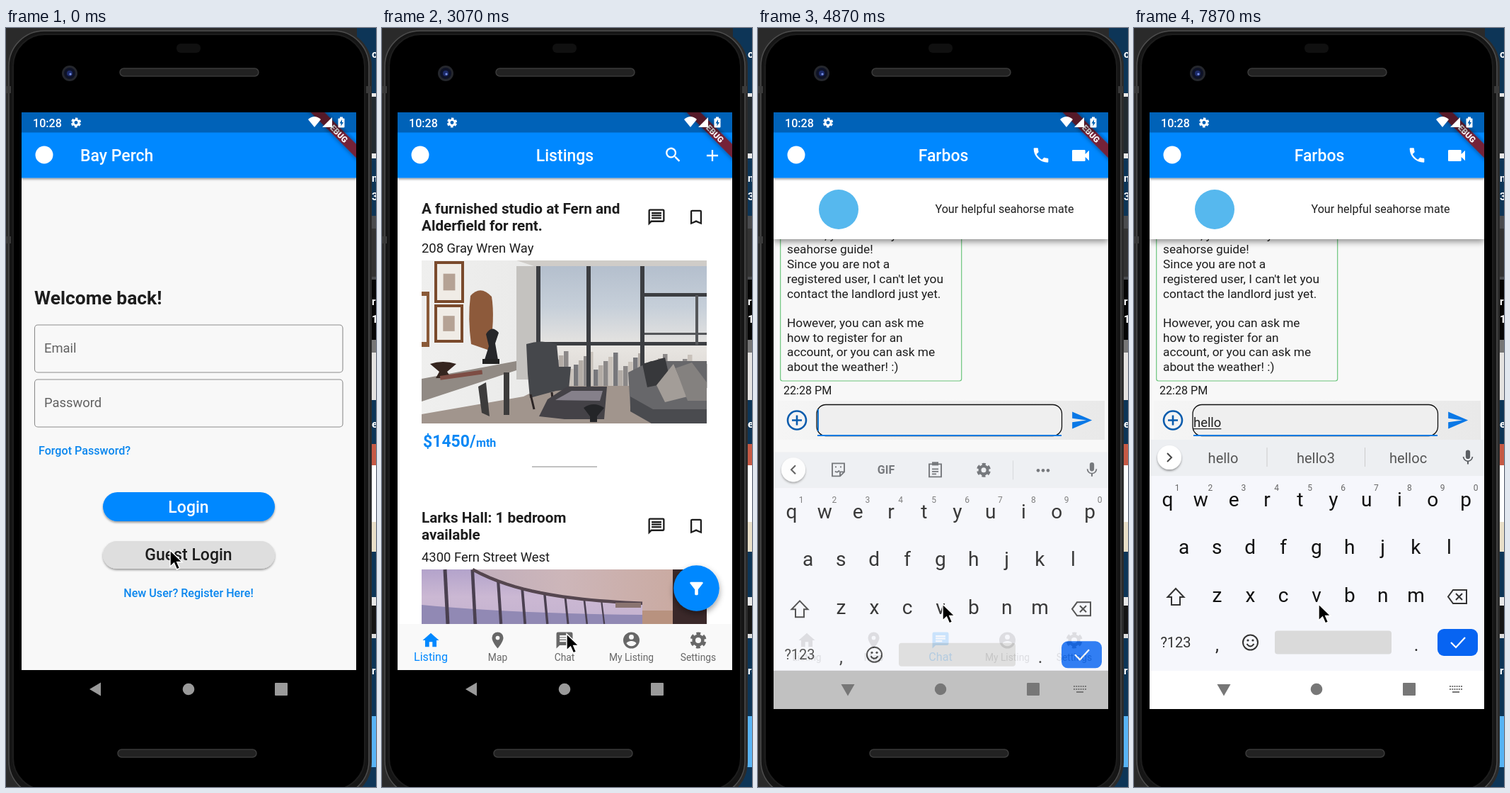
Write an HTML page that moves like this. It is 523x1071 px and loops after 8000 ms.

```html
<!DOCTYPE html>
<html lang="en">
<head>
<meta charset="utf-8">
<title>Chat walkthrough</title>
<style>
html, body { margin: 0; width: 100%; height: 100%; overflow: hidden; background: #1b1b1b; }
svg { display: block; width: 523px; height: 1071px; font-family: Roboto, "Open Sans", sans-serif; }
text { white-space: pre; }
</style>
</head>
<body>
<svg id="stage" viewBox="0 0 523 1071"></svg>
<script>
const BLUE = '#0088ff', INK = '#1d1d1d', GREY = '#686868';

// ---- drawing helpers -------------------------------------------------
const text = (x, y, size, str, fill = INK, weight = 400, anchor = 'start') =>
  `<text x="${x}" y="${y}" font-size="${size}" fill="${fill}" font-weight="${weight}" text-anchor="${anchor}">${str}</text>`;
const mid = (x, y, size, str, fill, weight) => text(x, y, size, str, fill, weight, 'middle');
const rect = (x, y, w, h, fill, r = 0, extra = '') =>
  `<rect x="${x}" y="${y}" width="${w}" height="${h}" rx="${r}" fill="${fill}" ${extra}/>`;
const circle = (x, y, r, fill, extra = '') => `<circle cx="${x}" cy="${y}" r="${r}" fill="${fill}" ${extra}/>`;
const path = (d, fill, extra = '') => `<path d="${d}" fill="${fill}" ${extra}/>`;
const line = (d, color, w = 2, extra = '') => path(d, 'none', `stroke="${color}" stroke-width="${w}" ${extra}`);
const group = (id, inner, extra = '') => `<g id="${id}" ${extra}>${inner}</g>`;

const ICONS = {
  search: 'M15.5 14h-.8l-.3-.3A6.5 6.5 0 1 0 13.7 14.4l.3.3v.8l5 5 1.5-1.5zm-6 0a4.5 4.5 0 1 1 0-9 4.5 4.5 0 0 1 0 9z',
  add: 'M19 13h-6v6h-2v-6H5v-2h6V5h2v6h6z',
  home: 'M10 20v-6h4v6h5v-8h3L12 3 2 12h3v8z',
  place: 'M12 2a7 7 0 0 0-7 7c0 5.2 7 13 7 13s7-7.8 7-13a7 7 0 0 0-7-7zm0 9.5a2.5 2.5 0 0 1 0-5 2.5 2.5 0 0 1 0 5z',
  chat: 'M20 2H4a2 2 0 0 0-2 2v18l4-4h14a2 2 0 0 0 2-2V4a2 2 0 0 0-2-2zM6 9h12v2H6zm8 5H6v-2h8zm4-6H6V6h12z',
  message: 'M20 2H4a2 2 0 0 0-2 2v18l4-4h14a2 2 0 0 0 2-2V4a2 2 0 0 0-2-2zm0 14H5.2L4 17.2V4h16zM6 12h12v2H6zm0-3h12v2H6zm0-3h12v2H6z',
  mark: 'M17 3H7a2 2 0 0 0-2 2v16l7-3 7 3V5a2 2 0 0 0-2-2zm0 15l-5-2.2L7 18V5h10z',
  user: 'M12 2a10 10 0 1 0 0 20 10 10 0 0 0 0-20zm0 3a3 3 0 1 1 0 6 3 3 0 0 1 0-6zm0 14.2A7.2 7.2 0 0 1 6 16c0-2 4-3.1 6-3.1s6 1.1 6 3.1a7.2 7.2 0 0 1-6 3.2z',
  phone: 'M6.6 10.8c1.4 2.8 3.8 5.1 6.6 6.6l2.2-2.2c.3-.3.7-.4 1-.2 1.1.4 2.3.6 3.6.6a1 1 0 0 1 1 1V20a1 1 0 0 1-1 1A17 17 0 0 1 3 4a1 1 0 0 1 1-1h3.5a1 1 0 0 1 1 1c0 1.3.2 2.5.6 3.6.1.3 0 .7-.3 1z',
  video: 'M17 10.5V7a1 1 0 0 0-1-1H4a1 1 0 0 0-1 1v10a1 1 0 0 0 1 1h12a1 1 0 0 0 1-1v-3.5l4 4v-11z',
  send: 'M2 21l21-9L2 3v7l15 2-15 2z',
  funnel: 'M4.2 5.6L10 13v6a1 1 0 0 0 1 1h2a1 1 0 0 0 1-1v-6l5.8-7.4A1 1 0 0 0 19 4H5a1 1 0 0 0-.8 1.6z',
  mic: 'M12 14a3 3 0 0 0 3-3V5a3 3 0 0 0-6 0v6a3 3 0 0 0 3 3zm5.3-3a5.3 5.3 0 0 1-10.6 0H5a7 7 0 0 0 6 6.7V21h2v-3.3a7 7 0 0 0 6-6.7z'
};
const place = (x, y, size, inner) =>
  `<g transform="translate(${x - size / 2} ${y - size / 2}) scale(${size / 24})">${inner}</g>`;
const icon = (name, x, y, fill, size = 27.6) => place(x, y, size, path(ICONS[name], fill, 'fill-rule="evenodd"'));
// Six teeth, the first one centred at 30 degrees.
const gear = (x, y, fill, size = 27.6) => {
  const step = 2 * Math.PI * 8.2 / 6, tooth = step * .57;
  return place(x, y, size,
    circle(12, 12, 5.5, 'none', `stroke="${fill}" stroke-width="4"`) +
    circle(12, 12, 8.2, 'none', `stroke="${fill}" stroke-width="3.600" stroke-dasharray="${tooth} ${step - tooth}" stroke-dashoffset="${(tooth - step) / 2}"`));
};

// ---- phone and desktop -----------------------------------------------
function desktop() {
  const bands = [
    [0, 265, '#0d3557'], [92, 92, '#e8e8e8'], [97, 80, '#222a30'], [265, 90, '#4a4c4f'], [283, 68, '#333'],
    [355, 85, '#050505'], [440, 18, '#777'], [458, 67, '#e4e2e0'], [525, 62, '#0d3557'], [587, 30, '#c65a45'],
    [617, 80, '#fff'], [697, 42, '#e9dfc8'], [739, 64, '#0d3557'], [803, 12, '#e8e8e8'], [815, 40, '#151515'],
    [855, 6, '#ddd'], [861, 110, '#0d3557'], [971, 72, '#58b4f5'], [1043, 28, '#0d3557']];
  const words = [['ot', 42], ['n', 217], ['3', 243], ['r', 391], ['1', 416], ['e', 564], ['re', 912]];
  return rect(0, 0, 523, 1071, '#2a2a2a') +
    bands.map(([y, h, c]) => rect(496, y, 27, h, c)).join('') +
    words.map(([s, y]) => text(517, y, 15, s, '#fff', 700)).join('');
}
function phone() {
  const slot = (x, y) => rect(x, y, 196, 11, '#222', 5.5, 'stroke="#3a3a3a" stroke-width="1.5"');
  return rect(0, 2, 517, 1086, '#2b2b2b', 52) +
    rect(4, 4, 509, 1080, '#151515', 50, 'stroke="#4d4d4d" stroke-width="1.500"') +
    rect(10, 9, 497, 1066, '#000', 45, 'stroke="#1d1d1d" stroke-width="2"') +
    rect(0, 82, 7, 10, '#3a3a3a') + rect(0, 294, 7, 10, '#3a3a3a') + rect(509, 82, 7, 10, '#3a3a3a') +
    rect(241, 22, 34, 13, '#101010', 6) + slot(161, 57) + slot(158, 1018) +
    circle(90, 64, 11, '#25272d') + circle(90, 64, 8, '#0e1226') + circle(90, 64, 4, '#1d2b6b') + circle(91, 65, 1.6, '#7e96e8');
}
// The system bar dims whatever the page draws beneath it.
function statusBar() {
  return rect(22, 119, 473, 28.5, 'rgba(0,0,0,.28)') +
    text(38, 140, 16.1, '10:28', '#fff', 500) + gear(99, 133.5, '#fff', 17) +
    path('M427 129Q436 121 445 129L436 140Z', '#fff') + path('M461 126V140H447Z', '#fff') +
    rect(469.5, 127.5, 9, 13, '#fff', 1) + rect(472, 125.5, 4, 3, '#fff') +
    path('M475 129l-3.5 5.5h2v4l3.5-5.5h-2z', '#0061b3');
}
const ribbon = () =>
  `<g transform="translate(468 146.500) rotate(45)">` +
  rect(-60, -6.9, 120, 13.8, '#742338', 0, 'filter="url(#soft)"') + mid(0, 4.2, 11.7, 'DEBUG', '#fff', 900) + '</g>';
const appBar = () => rect(22, 110, 473, 101.5, BLUE, 0, 'filter="url(#drop)"') + circle(54, 179, 12.5, '#fff');

function tabs(selected) {
  const items = [['home', 'Listing'], ['place', 'Map'], ['chat', 'Chat'], ['user', 'My Listing'], ['gear', 'Settings']];
  return rect(22, 841, 473, 65, '#f9f9f9') + items.map(([name, label], i) => {
    const x = 69 + i * 94.5, on = i === selected, c = on ? BLUE : GREY;
    return (name === 'gear' ? gear(x, 864, c) : icon(name, x, 864, c)) + mid(x, 893, on ? 16.1 : 13.8, label, c);
  }).join('');
}

// ---- pages -----------------------------------------------------------
function loginPage() {
  const field = (y, label) =>
    rect(40.5, y, 435.5, 67, 'none', 4.5, 'stroke="#8d8d8d" stroke-width="1.1"') + text(54, y + 39, 18.4, label, '#616161');
  const pill = (y, h, fill) => rect(137, y, 243, h, fill, h / 2, 'filter="url(#drop)"');
  return rect(22, 119, 473, 787, '#f8f8f8') + appBar() + text(105, 188, 23, 'Bay Perch', '#fff', 500) +
    text(40, 390, 26.4, 'Welcome back!', INK, 700) + field(419, 'Email') + field(496, 'Password') +
    text(46, 602, 16.1, 'Forgot Password?', '#0a86ee', 500) +
    pill(655, 41, BLUE) + mid(258, 684, 23, 'Login', '#fff', 500) +
    pill(724, 39, '#dedede') + circle(232, 740, 0, '#000', 'id="press" clip-path="url(#pill)"') +
    mid(258, 751, 23, 'Guest Login', INK, 500) + mid(258, 803, 16.1, 'New User? Register Here!', '#0a86ee', 500);
}
function studioPhoto() {
  let city = '';
  for (let i = 0; i < 34; i++) {
    const h = 22 + (i * 37 % 31);
    city += rect(222 + i * 7, 508 - h, 6.5, h, ['#b3aca6', '#8b8888', '#c8c1ba', '#77777b'][i % 4]);
  }
  const frame = (x, y, w, h) => rect(x, y, w, h, '#7a4a2c') + rect(x + 4, y + 4, w - 8, h - 8, '#f0ece6') +
    rect(x + w * .3, y + h * .3, w * .4, h * .4, '#b5a294');
  return rect(56, 328, 403, 230, 'url(#wall)') + path('M56 328H459V337H218L190 328Z', '#cfccc8') + rect(190, 336, 28, 160, '#c4c2bf') +
    rect(218, 336, 241, 172, 'url(#sky)') + city + path('M56 558V545L200 520L230 505H459V558Z', '#a1958d') +
    rect(218, 443, 241, 5, '#3c3e42') + [218, 289, 365].map(x => rect(x, 336, 6, 172, '#3c3e42')).join('') +
    rect(371, 374, 88, 5, '#3c3e42') + rect(443, 377, 4, 70, '#55575a') + rect(371, 430, 88, 3, '#55575a') +
    frame(74, 329, 42, 59) + frame(74, 390, 41, 54) + rect(56, 372, 11, 78, '#8a5a38') + rect(56, 378, 7, 65, '#eee') +
    path('M125 378Q139 362 155 379Q160 410 152 455L126 446Q121 410 125 378Z', '#8d5a3b') +
    path('M147 432Q155 418 165 430L160 445L164 468H145L151 449Z', '#26272a') + rect(142, 467, 24, 7, '#222') +
    path('M56 495L190 470V483L56 527Z', '#918a84') + path('M136 506L147 500L152 548L141 543ZM172 486H180V546H172Z', '#3d3c3c') +
    path('M68 474Q86 468 105 474L92 485L98 494H76L81 485Z', '#35251f') + rect(82, 487, 60, 6, '#7d4d44', 0, 'transform="rotate(-8 110 490)"') +
    path('M204 446Q225 439 247 446L250 478H267L264 510L246 512L209 522L206 488Z', '#45474b') +
    path('M210 517L215 538M258 509L266 532M240 514L242 533', 'none', 'stroke="#2c2525" stroke-width="3"') +
    path('M234 524L262 506H318L314 552H258L222 548Z', '#444247') + path('M245 525L268 512H312L308 526Z', '#85808a') +
    path('M285 536Q299 526 314 536L304 548V556H294V548Z', '#242528') +
    path('M348 486L380 470H459V558H381L351 535Z', '#67676a') + path('M368 474L400 465L408 500L375 507Z', '#37383b') +
    path('M388 504L412 474L432 520L400 528Z', '#a39d98') + path('M415 480L438 472L459 500V526H432Z', '#84817f') +
    path('M351 520L383 538H459V558H381L351 541Z', '#4a4b4f');
}
function loftPhoto() {
  // The window head sweeps down to the right; posts hang from it.
  const head = x => 764 + 52 * (1 - Math.exp((128 - Math.max(x, 128)) / 95));
  let rail = '', posts = '';
  for (let x = 128; x <= 368; x += 12) rail += `L${x} ${head(x)}`;
  for (let i = 0; i < 8; i++) {
    const x = 90 + i * 40 - i * i * 1.2;
    posts += line(`M${x - 1} ${head(x)}L${x + 3} 841`, '#4a4050', 5 - i * .4);
  }
  return rect(56, 764, 403, 77, 'url(#ceiling)') + path(`M56 764${rail}V841H56Z`, 'url(#dusk)') +
    path('M56 814Q180 826 368 828V841H56Z', '#9189b4') + posts + line('M' + rail.slice(1), '#55464f', 4.5) +
    rect(330, 811, 36, 7, '#8a7470') + rect(368, 822, 91, 19, '#b8927f') + rect(411, 764, 48, 77, '#3a2829');
}
function listingPage() {
  const head = (y, a, b, addr) => text(56, y, 20.7, a, INK, 700) + text(56, y + 24, 20.7, b, INK, 700) +
    text(56, y + 55, 18.4, addr, INK) + icon('message', 388, y + 5, INK) + icon('mark', 444, y + 5, INK);
  return rect(22, 119, 473, 787, '#fff') + appBar() + mid(258.5, 188, 23, 'Listings', '#fff', 500) +
    icon('search', 411.5, 179, '#fff') + icon('add', 467, 180, '#fff') +
    head(262, 'A furnished studio at Fern and', 'Alderfield for rent.', '208 Gray Wren Way') + studioPhoto() +
    text(58, 591, 23, '$1450/', '#0a88f5', 700) + text(133, 591, 16.1, 'mth', '#0a88f5', 700) +
    rect(212, 618.5, 92, 1.2, '#999') +
    head(698, 'Larks Hall: 1 bedroom', 'available', '4300 Fern Street West') + loftPhoto() + tabs(0) +
    circle(444.5, 790.5, 32.3, BLUE, 'filter="url(#deep)"') + icon('funnel', 444.5, 791, '#fff');
}
function chatPage() {
  const says = ["Welcome to Bay Perch! I'm", 'Farbos, your friendly', 'seahorse guide!', 'Since you are not a',
    "registered user, I can't let you", 'contact the landlord just yet.', '', 'However, you can ask me',
    'how to register for an', 'account, or you can ask me', 'about the weather! :)'];
  const bubble = rect(31.7, 511, 256, 247, 'none', 3, 'stroke="#6cc57c" stroke-width="1.2"') +
    says.map((s, i) => text(41, 537 + i * 20.7, 17.26, s)).join('') + text(36, 777, 16.1, '22:28 PM');
  const composer = rect(28, 786, 462, 55, 'url(#bar)') +
    circle(55, 813.5, 13, 'none', 'stroke="#0b5cad" stroke-width="2.600"') + line('M48 813.5H62M55 806.5V820.5', '#0b5cad', 2.6) +
    rect(83, 791.5, 346.5, 44, '#efefef', 13, 'stroke="#111" stroke-width="1.300"') +
    '<path id="underline" d="M84 835H429" stroke="#333" stroke-width="1"/>' + icon('send', 457.5, 813.5, '#0a78e6', 32) +
    '<text id="typed" x="84" y="823" font-size="18.4" fill="#222"></text>' +
    rect(84, 825, 0, 1.2, '#222', 0, 'id="composing"') + rect(84, 798, 2, 31, '#1778d2', 0, 'id="caret"');
  return rect(22, 119, 473, 787, '#f8f8f8') + tabs(2) + circle(258, 870, 0, BLUE, 'id="tabPress" clip-path="url(#tabClip)"') +
    `<g clip-path="url(#body)">` + group('thread', group('bubble', bubble) + composer) + '</g>' +
    rect(22, 205, 473, 93, '#fff', 0, 'filter="url(#deep)"') + circle(114, 256, 28, '#56b8ee') +
    mid(348.5, 261, 16.1, 'Your helpful seahorse mate') + appBar() + mid(262, 188, 23, 'Farbos', '#fff', 500) +
    icon('phone', 400, 179.5, '#fff') + icon('video', 456, 180, '#fff', 32);
}

// ---- keyboard --------------------------------------------------------
function keyboard() {
  const row = (keys, x, y) => [...keys].map((k, i) => mid(x + i * 46.85, y, 28, k, '#111')).join('');
  const digits = [...'1234567890'].map((d, i) => mid(61 + i * 46.9, 652.5, 12, d, '#666')).join('');
  const chevron = d => circle(50, 606, 17, '#fff', 'filter="url(#drop)"') + line(d, '#444', 2);
  const c = '#5b5e63';
  const tools = chevron('M53 600L47 606L53 612') +
    line('M105 597H122V609L116 615H105ZM116 615V609H122M109 602H111M116 602H118M109 608Q112 611 115 607', c, 1.9) +
    mid(181, 612, 16, 'GIF', c, 700) + line('M242 598H259V616H242ZM246 605H255M246 608.5H255M246 612H252', c, 1.9) + rect(246, 595, 9, 5, c) +
    gear(319, 606.5, c, 24) + rect(360, 593, 1, 27, '#d0d2d5') + [396, 403, 410].map(x => circle(x, 607, 2.3, c)).join('');
  const words = chevron('M47 600L53 606L47 612') +
    [126, 257, 387.5].map(x => mid(x, 614, 20, '', '#555')).join('') + rect(187.5, 592, 1, 27, '#ccc') + rect(326, 592, 1, 27, '#ccc');
  return rect(22, 581, 473, 51, '#edeff2') + rect(22, 632, 473, 275, '#f6f7fc') +
    group('tools', tools) + group('words', words) + icon('mic', 472, 606, c, 25) +
    row('qwertyuiop', 47.5, 675) + digits + row('asdfghjkl', 70.5, 742) + row('zxcvbnm', 117.5, 810) +
    line('M59 791L47.5 803H53V814H65V803H70.5Z', '#333', 2) +
    line('M451 793H470V812H451L444 802.5ZM455 798L464 807M464 798L455 807', '#333', 2) +
    mid(59, 874, 20, '?123', '#333') + mid(117.5, 879, 25, ',', '#222') + mid(399, 879, 25, '.', '#222') +
    circle(164.5, 867, 10.5, 'none', 'stroke="#333" stroke-width="2"') + circle(161, 864, 1.6, '#333') + circle(168, 864, 1.6, '#333') +
    line('M159.5 869Q164.5 876 169.5 869', '#333', 2) +
    rect(199, 850.5, 165, 33, '#dadada', 4) + rect(429, 848, 57, 38, '#0764f2', 9) + line('M448 867L455 874L468 860', '#fff', 2.2);
}
const home = c => circle(258, 933, 8.3, c) + rect(380, 924, 18, 18, c, 1);
const softKeys = () => {
  let dots = '';
  for (let i = 0; i < 12; i++) dots += rect(446 + (i % 6) * 3.2, 928 + Math.floor(i / 6) * 4, 2, 2, '#777');
  return home('#777') + path('M117.5 926H136.5L127 942.5Z', '#777') + dots + rect(450, 936, 10, 2, '#777');
};

const stage = document.getElementById('stage');
const shade = (id, dy, blur, alpha) =>
  `<filter id="${id}" x="-20%" y="-30%" width="140%" height="190%"><feDropShadow dx="0" dy="${dy}" stdDeviation="${blur}" flood-opacity="${alpha}"/></filter>`;
const gradient = (id, dir, ...colors) => `<linearGradient id="${id}" ${dir}>` +
  colors.map((c, i) => `<stop offset="${i / (colors.length - 1)}" stop-color="${c}"/>`).join('') + '</linearGradient>';
const clip = (id, x, y, w, h, r = 0) => `<clipPath id="${id}">${rect(x, y, w, h, '#000', r)}</clipPath>`;
const DOWN = 'x2="0" y2="1"';
stage.innerHTML = '<defs>' + shade('drop', 2, 1.6, .38) + shade('deep', 4, 4, .4) + shade('soft', 0, 3, .5) +
  gradient('sky', DOWN, '#b4bfcd', '#c6cfd9', '#e8e5e1', '#d8d4d0') + gradient('wall', '', '#efefee', '#e9e9e8', '#cfcfce') +
  gradient('dusk', DOWN, '#b3a3cb', '#cbb8d3', '#c4b2cf') + gradient('ceiling', '', '#b9a9be', '#cdb6b9', '#c9a79b') +
  gradient('bar', '', '#f5f5f5', '#e9e9e9') +
  clip('screen', 22, 119, 473, 787) + clip('body', 22, 212, 473, 694) + clip('pill', 137, 724, 243, 39, 19.5) +
  clip('tabClip', 22, 841, 473, 65) + clip('keys', 22, 581, 473, 326) + '</defs>' +
  desktop() + phone() + home('#9a9a9a') + path('M118 933L134 923.5V942.5Z', '#9a9a9a', 'id="back"') +
  `<g clip-path="url(#screen)">` + group('login', loginPage()) + group('listing', listingPage()) + group('chat', chatPage()) +
  ribbon() + statusBar() + '</g>' +
  group('softNav', group('navFill', rect(22, 906, 473, 55, '#fff') + rect(22, 906, 473, 1, '#ddd')) + softKeys()) +
  `<g clip-path="url(#keys)">` + group('keyboard', keyboard()) + '</g>' +
  group('pointer', path('M0 0V23L5.5 18L9.5 27L13.5 25.2L9.7 16.5H17Z', '#000', 'stroke="#fff" stroke-width="1.400"'));

// ---- timeline --------------------------------------------------------
const $ = id => document.getElementById(id);
const show = (id, on) => $(id).setAttribute('display', on ? 'inline' : 'none');
const set = (id, key, value) => $(id).setAttribute(key, value);
const clamp = v => Math.max(0, Math.min(1, v));

// Interpolates rows of [time, value].
function track(rows, t) {
  const i = rows.findIndex(r => r[0] > t);
  if (i === 0) return rows[0][1];
  if (i < 0) return rows[rows.length - 1][1];
  const [t0, a] = rows[i - 1], [t1, b] = rows[i];
  return a + (b - a) * (t - t0) / (t1 - t0);
}
// Last row whose time has come.
const latest = (rows, t) => rows.filter(r => r[0] <= t).pop()[1];

const POINTER_X = [[1930, 232], [2300, 241], [2700, 257], [2930, 261]];
const POINTER_Y = [[1930, 737], [2300, 770], [2700, 840], [2930, 855], [3800, 855], [4000, 832], [4130, 822],
  [4269, 822], [4270, 816], [4329, 816], [4330, 813]];
const KEYS_Y = [[4730, 62], [4800, 38], [4870, 17.5], [4930, 7], [5000, 2], [5070, 0]];
const KEYS_ALPHA = [[4670, 0], [4730, .3], [4800, .58], [4870, .82], [4930, .92], [5070, 1]];
const TYPED = [[0, ''], [5400, 'h'], [5670, 'he'], [5730, 'hel'], [5870, 'hell'], [5930, 'hello']];
const HINTS = [[0, ['hey', 'hello', 'how']], [5730, ['hello', 'help', 'hell']], [6130, ['hello', 'hello3', 'helloc']]];
const CARET_ON = [[0, 4530], [5400, 5400], [5670, 5670], [5930, 6130], [7130, 7130]];

function ripple(id, t, start, end, radius, alpha) {
  const p = clamp((t - start) / (end - start));
  set(id, 'r', radius * Math.sqrt(p));
  set(id, 'opacity', alpha * (1 - p));
}
const hints = [...$('words').querySelectorAll('text')];

function draw(t) {
  show('login', t < 1470);
  show('listing', t >= 1470 && t < 3200);
  show('chat', t >= 3200);
  show('bubble', t >= 3730);
  ripple('press', t, 730, 1000, 140, .14);
  ripple('tabPress', t, 3200, 3470, 70, .16);
  set('pointer', 'transform', `translate(${track(POINTER_X, t)} ${track(POINTER_Y, t)})`);

  const focus = t >= 4530, open = t >= 4670, alpha = track(KEYS_ALPHA, t);
  set('thread', 'transform', `translate(0 ${t >= 4730 ? -260 : 0})`);
  set('underline', 'stroke', focus ? '#0a7ae0' : '#333');
  set('underline', 'stroke-width', focus ? 2 : 1);
  show('keyboard', open);
  show('softNav', open);
  show('back', !open);
  set('keyboard', 'transform', `translate(0 ${track(KEYS_Y, t)})`);
  set('keyboard', 'opacity', alpha);
  set('navFill', 'opacity', alpha * (alpha < 1 ? .92 : 1));

  const typed = latest(TYPED, t);
  $('typed').textContent = typed;
  const width = typed ? $('typed').getComputedTextLength() : 0;
  set('composing', 'width', width);
  set('caret', 'x', 84 + width + (typed ? .5 : 0));
  const fade = 1 - clamp((t - latest(CARET_ON, t) - 500) / 200);
  set('caret', 'opacity', focus ? fade : 0);
  show('tools', !typed);
  show('words', typed);
  latest(HINTS, t).forEach((word, i) => { hints[i].textContent = word; });
}

const begin = performance.now();
function tick() {
  draw((performance.now() - begin) % 8000);
  requestAnimationFrame(tick);
}
tick();
</script>
</body>
</html>
```
